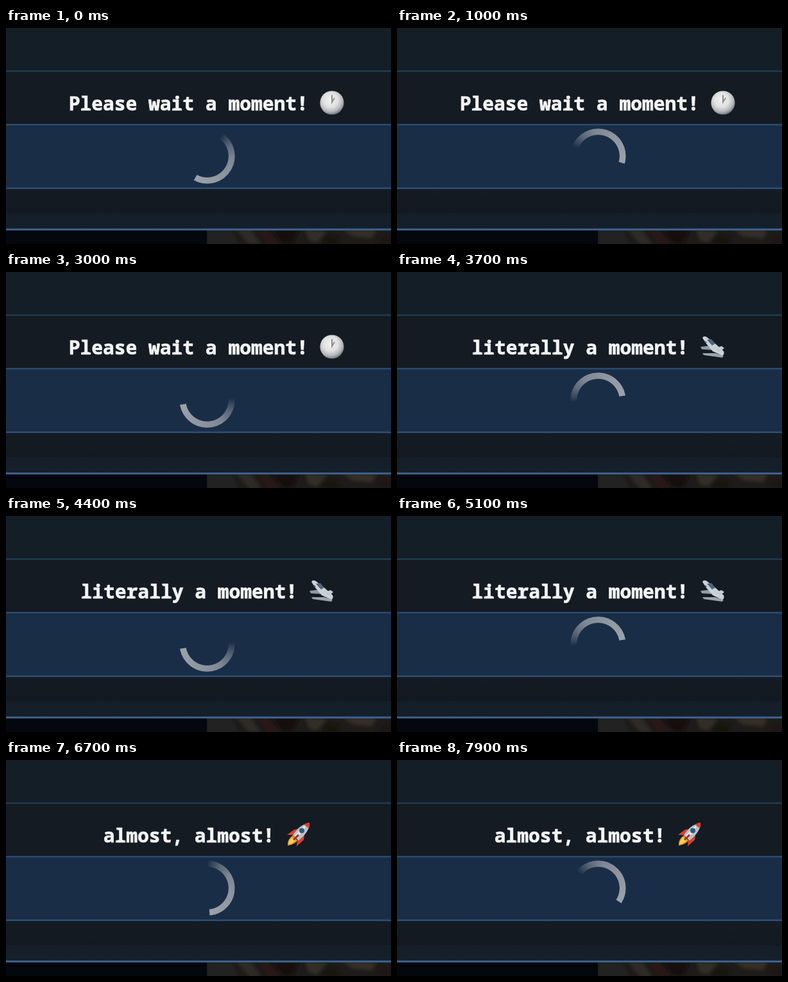
Write an HTML page that moves like this. It is 600x338 px and loops after 8000 ms.

```html
<!DOCTYPE html>
<html lang="en">
<head>
<meta charset="utf-8">
<title>Please wait</title>
<style>
  html, body { margin: 0; width: 100%; height: 100%; overflow: hidden; background: #131e27; }
  #stage { position: absolute; left: 0; top: 0; width: 600px; height: 338px; overflow: hidden; }
  svg { position: absolute; left: 0; top: 0; }
  text {
    font: 700 29.6px "Noto Sans Mono", "DejaVu Sans Mono", monospace;
    fill: #f2f4f5;
    stroke: #f2f4f5;
    stroke-width: 0.7px;
    white-space: pre;
  }
  .message { filter: blur(0.75px); }
  .dividers { filter: blur(0.6px); }
  #spinner {
    position: absolute; left: 270px; top: 157px; width: 87px; height: 87px;
    border-radius: 50%;
    filter: blur(0.6px);
    /* The sharp head points right at zero rotation; the tail trails half a turn. */
    background: conic-gradient(from 90deg,
      transparent 0 184deg,
      rgba(228, 228, 226, .14) 197deg,
      rgba(228, 228, 226, .32) 216deg,
      rgba(228, 228, 226, .49) 245deg,
      rgba(228, 228, 226, .57) 290deg,
      rgba(228, 228, 226, .64) 359.4deg,
      transparent 360deg);
    -webkit-mask: radial-gradient(circle, transparent 32.8px, #000 33.8px 42.8px, transparent 43.6px);
    mask: radial-gradient(circle, transparent 32.8px, #000 33.8px 42.8px, transparent 43.6px);
  }
</style>
</head>
<body>
<div id="stage">
  <svg width="600" height="338" viewBox="0 0 600 338">
    <defs>
      <linearGradient id="shade" x2="0" y2="1">
        <stop stop-color="#151b24"/><stop offset="1" stop-color="#121921"/>
      </linearGradient>
      <linearGradient id="footer" x2="0" y2="1">
        <stop stop-color="#151f29"/><stop offset=".7" stop-color="#151f29"/>
        <stop offset="1" stop-color="#11202f"/>
      </linearGradient>
      <radialGradient id="face" cx=".44" cy=".38" r=".62">
        <stop stop-color="#f3f3f2"/><stop offset=".5" stop-color="#dfe0e0"/>
        <stop offset=".8" stop-color="#b4b7b9"/><stop offset="1" stop-color="#777b7f"/>
      </radialGradient>
      <filter id="soft" x="-20%" y="-60%" width="140%" height="220%"><feGaussianBlur stdDeviation="2.5"/></filter>
      <clipPath id="photo"><path d="M313 317H600V338H313Z"/></clipPath>
    </defs>

    <!-- panels -->
    <path fill="#141e27" d="M0 0H600V67H0Z"/>
    <path fill="#141b23" d="M0 67H600V151H0Z"/>
    <path fill="#1a2d47" d="M0 151H600V251H0Z"/>
    <path fill="url(#shade)" d="M0 251H600V290H0Z"/>
    <path fill="url(#footer)" d="M0 290H600V316H0Z"/>
    <path fill="#04070d" d="M0 316H313V338H0Z"/>

    <!-- dimmed picture -->
    <g clip-path="url(#photo)">
      <path fill="#1e1c1a" d="M313 316H600V338H313Z"/>
      <g filter="url(#soft)">
        <path fill="#242422" d="M313 316H352L362 340H313Z"/>
        <path fill="#2f2a25" d="M358 314L382 316L398 340H380Z"/>
        <path fill="#2a1815" d="M392 316L406 318L424 336L410 340Z"/>
        <path fill="#12110f" d="M414 316H456L446 338H430Z"/>
        <path fill="#332e28" d="M466 315L500 318L484 336L472 332Z"/>
        <path fill="#161311" d="M498 322L520 328V340H490Z"/>
        <path fill="#352e27" d="M524 315H578L570 329L540 326Z"/>
        <path fill="#1b1815" d="M582 324H604V340H578Z"/>
      </g>
    </g>

    <g class="dividers" stroke-width="2.6">
      <path stroke="#213c52" d="M-5 67.5H605"/>
      <path stroke="#2a4a6c" d="M-5 151.3H605"/>
      <path stroke="#2d4f73" d="M-5 250.8H605"/>
      <path stroke="#3f638e" stroke-width="3" d="M-5 315.2H605"/>
    </g>

    <g class="message">
      <text x="97.8" y="128.8">Please wait a moment!</text>
      <circle cx="508" cy="117" r="18.6" fill="url(#face)"/>
      <path d="M508 105V116L512 109.5" fill="none" stroke="#8a8e91" stroke-width="2"/>
    </g>

    <g class="message">
      <text x="116.6" y="128.8">literally a moment!</text>
      <path fill="#8d9ba8" d="M473 117L490 115L501 119L490 122L475 121Z"/>
      <path fill="#98a4ae" d="M476 127L496 127L509 131L507 134L478 130Z"/>
      <path fill="#cbd1d6" d="M476 103Q478 99 483 102L497 113L509 124Q511 129 507 131L492 124L481 111Z"/>
      <path fill="#4f647c" d="M483 106L490 105L496 112L491 115Z"/>
      <path fill="#c6ced5" d="M496 119L506 116L510 119L502 126Z"/>
      <path fill="#44576d" d="M478 107L483 110L481 112Z"/>
    </g>

    <g class="message">
      <text x="151.8" y="128.8">almost, almost!</text>
      <path fill="#d9412d" d="M449 109L461 107L455 118L438 117ZM466 112L464 125L453 135L454 121Z"/>
      <path fill="#e9902b" d="M447 118L454 126Q450 132 439 134Q438 124 447 118Z"/>
      <path fill="#f5d252" d="M446 121L451 126Q447 131 440 132Q441 125 446 121Z"/>
      <path fill="#b5c3ce" d="M473 98Q474 111 456 126L447 118Q457 101 473 98Z"/>
      <path fill="#e0e5e8" d="M468 101Q459 106 450 119L453 122Q464 113 468 101Z"/>
      <path fill="#d9412d" d="M473 98Q474 103 472 107L464 101Q469 98 473 98Z"/>
      <circle cx="461" cy="110.5" r="4" fill="#365879"/>
      <path stroke="#a52c27" stroke-width="3" d="M456 117L448 125"/>
    </g>
  </svg>
  <div id="spinner"></div>
</div>
<script>
  const LOOP = 8000, STEP = 100, TURN = 1400;
  const START = 119.5, SKIP = 43;
  const FADE = 100;
  const swaps = [3400, 6400];

  const spinner = document.getElementById("spinner");
  const messages = [...document.querySelectorAll(".message")];

  function draw(t) {
    // The spinner skips ahead as the last message arrives.
    const angle = START + 360 * t / TURN + (t >= swaps[1] ? SKIP : 0);
    spinner.style.transform = `rotate(${angle}deg)`;

    const shown = swaps.filter(s => t >= s).length;
    const fading = t >= swaps[shown] - FADE;
    messages.forEach((m, i) => {
      m.style.opacity = i !== shown ? 0 : fading ? 0.6 : 1;
    });
  }

  const begin = performance.now();
  function tick() {
    const t = (performance.now() - begin) % LOOP;
    draw(Math.floor(t / STEP) * STEP);
    requestAnimationFrame(tick);
  }
  tick();
</script>
</body>
</html>
```
